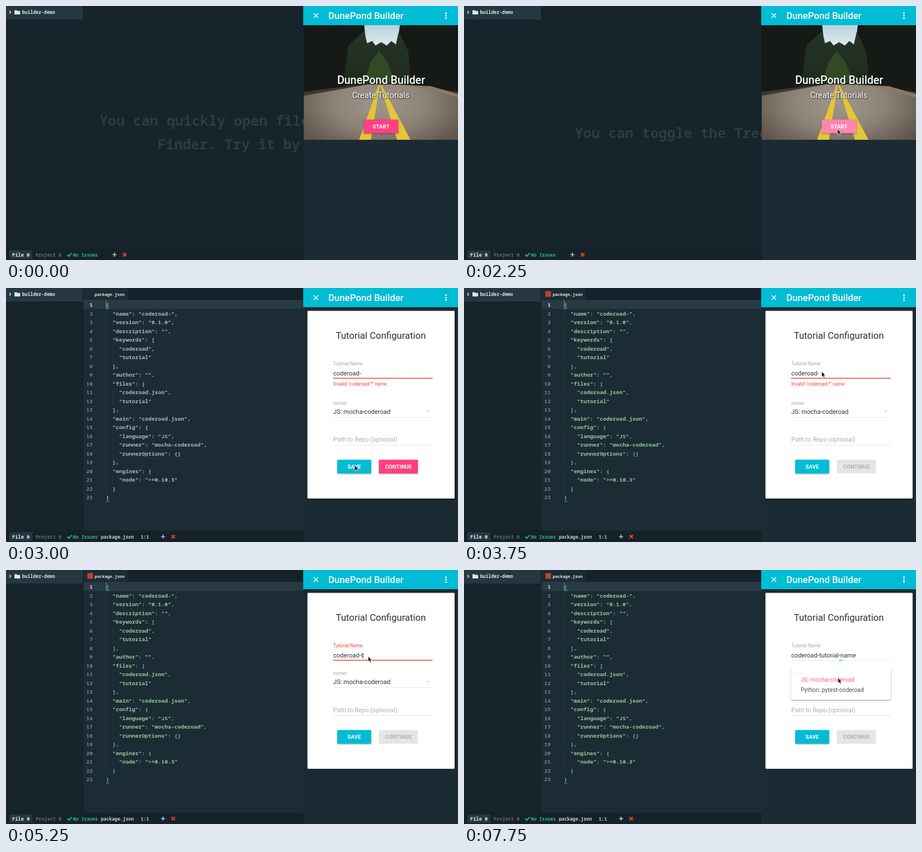
An HTML page for the animation above (8000 ms loop, 800 by 450 pixels).

```html
<!DOCTYPE html>
<html lang="en">
<head>
<meta charset="utf-8">
<title>Tutorial builder</title>
<style>
html, body { margin: 0; height: 100%; overflow: hidden; background: #17242b; }
svg { display: block; width: 100vw; height: 100vh; }
text { white-space: pre; }
.ui { font-family: Roboto, sans-serif; }
.mono { font-family: "Noto Sans Mono", "DejaVu Sans Mono", monospace; font-weight: 600; }
.bold { font-weight: 700; }
.medium { font-weight: 500; }
.middle { text-anchor: middle; }
.end { text-anchor: end; }
.shadow { filter: drop-shadow(0 1px 1px #0006); }
.title-shadow { filter: drop-shadow(1px 1px 1px #000c); }
</style>
</head>
<body>
<svg viewBox="0 0 800 450">
  <defs>
    <linearGradient id="sky" x2="0" y2="1"><stop stop-color="#b9d3df"/><stop offset="1" stop-color="#e3ebea"/></linearGradient>
    <radialGradient id="road" gradientUnits="userSpaceOnUse" cx="0" cy="0" r="1" gradientTransform="translate(663 172) scale(165 95)">
      <stop stop-color="#a0968c"/><stop offset=".5" stop-color="#8d8378"/><stop offset="1" stop-color="#5e554c"/>
    </radialGradient>
    <linearGradient id="wood" x2="0" y2="1"><stop stop-color="#26352a"/><stop offset="1" stop-color="#1d2a19"/></linearGradient>
  </defs>
  <g id="stage"></g>
</svg>
<script>
const LOOP = 8000, STEP = 250;
const TEAL = '#00bcd4', PINK = '#ff4081', RED = '#f44336', GREEN = '#26b796';
const APP = 'DunePond Builder';
const CODE = `{
  "name": "coderoad-",
  "version": "0.1.0",
  "description": "",
  "keywords": [
    "coderoad",
    "tutorial"
  ],
  "author": "",
  "files": [
    "coderoad.json",
    "tutorial"
  ],
  "main": "coderoad.json",
  "config": {
    "language": "JS",
    "runner": "mocha-coderoad",
    "runnerOptions": {}
  },
  "engines": {
    "node": ">=0.10.3"
  }
}`.split('\n');
// time, x, y of the pointer tip
const POINTER = [
  [750, 661, 218], [2500, 661, 218], [3000, 617, 314], [3250, 617, 314],
  [3750, 633, 148], [4250, 641, 153], [6750, 641, 153], [7250, 662, 191], [8000, 662, 191]
];

const rect = (x, y, w, h, fill, extra = '') =>
  `<rect x="${x}" y="${y}" width="${w}" height="${h}" fill="${fill}" ${extra}/>`;
const path = (d, fill, extra = '') => `<path d="${d}" fill="${fill}" ${extra}/>`;
const stroke = (d, color, width = 1) => path(d, 'none', `stroke="${color}" stroke-width="${width}"`);
const text = (x, y, size, fill, str, cls = '') =>
  `<text class="ui ${cls}" x="${x}" y="${y}" font-size="${size}" fill="${fill}">${str}</text>`;
const mono = (x, y, size, fill, str, cls = '') =>
  `<text class="mono ${cls}" x="${x}" y="${y}" font-size="${size}" fill="${fill}">${str}</text>`;
const button = (x, y, w, label, fill, color = '#fff', cls = 'shadow') =>
  rect(x, y, w, 24.3, fill, `rx="1.4" class="${cls}"`) +
  text(x + w / 2, y + 15.6, 9.7, color, label, 'bold middle');

function tree() {
  return rect(0, 0, 136, 24, '#263741') +
    stroke('M6 8.5l2.5 2.5L6 13.5', '#dfe6e9', 1.3) +
    path('M15 7.5h4l1.2 1.3H25V15H15z', '#dfe6e9') +
    mono(28.5, 14.2, 8.1, '#dfe6e9', 'builder-demo');
}

function statusBar(open) {
  const x = open ? 86 : 0;
  return rect(0, 430, 527, 20, '#16222a') + rect(6, 433, 40.5, 15, '#263741') +
    mono(11, 443.5, 8.6, '#e4eaec', 'File 0', 'bold') +
    mono(52.5, 443.5, 8.5, '#5d6c74', 'Project 0') +
    stroke('M108.5 440.5l2.7 2.8 4.8-5.5', GREEN, 2) +
    mono(118.5, 443.5, 8.15, GREEN, 'No Issues') +
    (open ? mono(168, 443.5, 8.1, '#c3ced2', 'package.json') + mono(238.5, 443.5, 8.1, '#c3ced2', '1:1') : '') +
    stroke(`M${188.5 + x} 440.5h7m-3.5-3.5v7`, '#b4c0c5', 1.7) +
    stroke(`M${207 + x} 437.5l6 6m0-6l-6 6`, '#e23c24', 2.4);
}

function tips(t) {
  const tip = (x, y, str, opacity) => `<g opacity="${opacity}">${mono(x, y, 24.75, '#2c3c44', str, 'bold')}</g>`;
  const before = t < 250 ? 1 : t < 500 ? .5 : 0;
  const after = t < 750 ? 0 : t < 1000 ? .5 : 1;
  return tip(165.5, 212, 'You can quickly open files', before) +
    tip(268, 254, 'Finder. Try it by', before) +
    tip(196, 234, 'You can toggle the Tree', after);
}

function codeLine(line, i, colored) {
  const y = 33 + i * 15.5, indent = line.search(/\S/);
  const spans = line.trim().split(/("[^"]*")/).map(part => {
    const color = !colored ? '#a9b7bd' : part[0] === '"' ? '#94c79b' : '#5cbcae';
    return `<tspan fill="${color}">${part}</tspan>`;
  }).join('');
  let guides = '';
  for (let k = 0; k < indent; k += 2)
    guides += stroke(`M${177.5 + k * 5.76} ${y - 11}v15.5`, '#2b3f47', .7);
  return guides + mono(153.5, y, 9.6, i ? '#70838b' : '#d5dee1', i + 1, 'end') +
    mono(177 + indent * 5.76, y, 9.6, '#5cbcae', spans);
}

function editor(colored) {
  return rect(136, 0, 391, 430, '#1c2c34') + rect(136, 0, 391, 21, '#16222a') +
    rect(137, 0, 78, 21, '#1c2c34') + rect(136, 0, 1, 430, '#131e25') +
    (colored ? rect(144, 5.5, 10, 10, '#c83a3c') : '') +
    mono(157, 13.5, 7.35, '#dfe6e9', 'package.json') +
    rect(137, 21, 390, 16, '#283a43') +
    CODE.map((line, i) => codeLine(line, i, colored)).join('') +
    stroke('M177.5 22v14', '#9fb4bb', .8) +
    stroke('M177 36.5h6M177 378h6', '#4aa99d', 1);
}

function header() {
  return rect(526, 0, 274, 34, TEAL) +
    stroke('M544.5 13l8 8m0-8l-8 8', '#fff', 1.5) +
    text(570.5, 23, 16.6, '#fff', APP, 'medium') +
    [12.7, 17, 21.3].map(y => `<circle cx="778.7" cy="${y}" r="1.5" fill="#fff"/>`).join('');
}

function photo() {
  return rect(527, 34, 273, 203, '#151a17') +
    path('M634 34H697L692 74H638z', 'url(#sky)') +
    path('M596 146L606 70 634 44 639 66 648 62 654 70 664 64 674 70 682 62 690 68 695 46 712 80 718 146z', 'url(#wood)') +
    path('M634 136L646 98 660 80 674 98 690 136z', '#314a25') +
    path('M527 152L640 138H700L800 152V170H527z', '#40382b') +
    path('M527 159L640 139H690L735 142 800 161V237H527z', 'url(#road)') +
    path('M690 139L752 142 800 156V162L735 145z', '#8b7a62') +
    path('M659.5 140h2L646 237H625z', '#e2c635') +
    path('M662.5 140h2L716 237H692z', '#e2c635');
}

function hero(pressed) {
  return photo() +
    text(664, 138, 19.4, '#fff', APP, 'medium middle title-shadow') +
    text(663.5, 163, 14.5, '#fff', 'Create Tutorials', 'middle title-shadow') +
    button(633, 201.3, 61.5, 'START', pressed ? '#ff85ae' : PINK);
}

function nameField(t) {
  const filled = t >= 3000, invalid = filled && t < 5500;
  const focused = !filled || (t >= 4250 && t < 7500);
  const accent = invalid ? RED : TEAL;
  const growing = t < 2750;
  const typed = Math.max(0, (t - 5250) / STEP * 2 + 1);
  const value = filled ? 'coderoad-' + 'tutorial-name'.slice(0, typed) : '';
  const caret = focused && !(t >= 4500 && t < 5000) && t !== 7000;
  const half = growing ? 57 : t < 7500 ? (focused || invalid ? 88 : 0) : t < 7750 ? 40 : 3;
  return text(579.3, growing ? 143.3 : 137.4, growing ? 9.2 : 8.28, focused && !growing ? accent : '#a6a6a6', 'Tutorial Name') +
    (filled ? '' : text(579.3, 154, 11.04, '#cfcfcf', 'coderoad-tutorial-name')) +
    text(579.3, 155.3, 11.04, '#303030', value +
      (caret ? `<tspan dx="-1" font-size="12" font-weight="300">|</tspan>` : '')) +
    rect(579, 159.8, 176, .7, '#dcdcdc') +
    rect(667 - half, 159.2, half * 2, 1.4, accent) +
    (filled && t < 5250 ? text(579.3, 172.8, 8.28, RED, 'Invalid "coderoad-*" name') : '');
}

function runnerField(t, shift) {
  const value = t < 3000
    ? text(579.3, 203, 11.04, '#a9a9a9', 'runner')
    : text(579.3, 186 + shift, 8.28, '#a6a6a6', 'runner') +
      text(579.3, 202.4 + shift, 11.04, '#303030', 'JS: mocha-coderoad');
  return value + rect(579, 208 + shift, 176, .7, '#dcdcdc') +
    path(`M743 ${196.5 + shift}h7l-3.5 3.5z`, '#dadada');
}

function menu(opacity) {
  return `<g opacity="${opacity}">` +
    rect(579, 175, 176.5, 55, '#fff', 'rx="1.4" class="shadow"') +
    text(579.3, 186, 8.28, '#fdeef2', 'runner') +
    text(596, 197.6, 10.35, '#ff5c94', 'JS: mocha-coderoad') +
    text(596, 215.6, 10.35, '#505050', 'Python: pytest-coderoad') + '</g>';
}

function form(t) {
  const error = t >= 3000 && t < 5250;
  const shift = error ? 20.8 : 0;
  const lower = t < 3000 ? 4.2 : shift;
  return rect(533.5, 40.5, 260.5, 311.7 + lower, '#fff', 'rx="1.4" class="shadow"') +
    text(663.5, 90, 16.6, '#303030', 'Tutorial Configuration', 'middle') +
    nameField(t) + runnerField(t, shift) +
    text(579.3, 251.5 + lower, 11.04, '#adadad', 'Path to Repo (optional)') +
    rect(579, 257.3 + lower, 176, .7, '#dcdcdc') +
    button(586.3, 283.5 + lower, 60, 'SAVE', TEAL) +
    (t < 3250 ? button(660, 283.5 + lower, 69, 'CONTINUE', PINK)
      : button(660, 283.5 + lower, 69, 'CONTINUE', '#e5e5e5', '#b0b0b0', '')) +
    (t >= 7500 ? menu(t < 7750 ? .6 : 1) : '');
}

function pointer(t) {
  const i = POINTER.findIndex(p => p[0] > t);
  if (i < 1) return '';
  const [t0, x0, y0] = POINTER[i - 1], [t1, x1, y1] = POINTER[i];
  const k = (t - t0) / (t1 - t0);
  return path('M0 0V9.6L2.2 7.6 3.8 11.2 5.5 10.4 3.9 6.9H7z', '#111',
    `stroke="#fff" stroke-width=".7" transform="translate(${x0 + (x1 - x0) * k} ${y0 + (y1 - y0) * k})"`);
}

function scene(t) {
  const open = t >= 3000;
  return rect(0, 0, 800, 450, '#17242b') + tree() +
    (open ? editor(t >= 3250) : tips(t)) + statusBar(open) +
    rect(527, 34, 273, 416, '#1c2b33') +
    (t < 2500 ? hero(t >= 2000) : form(t)) + header() + pointer(t);
}

const stage = document.getElementById('stage');
let shown = -1;
function tick() {
  const t = Math.floor(performance.now() % LOOP / STEP) * STEP;
  if (t !== shown) stage.innerHTML = scene(shown = t);
  requestAnimationFrame(tick);
}
tick();
</script>
</body>
</html>
```
